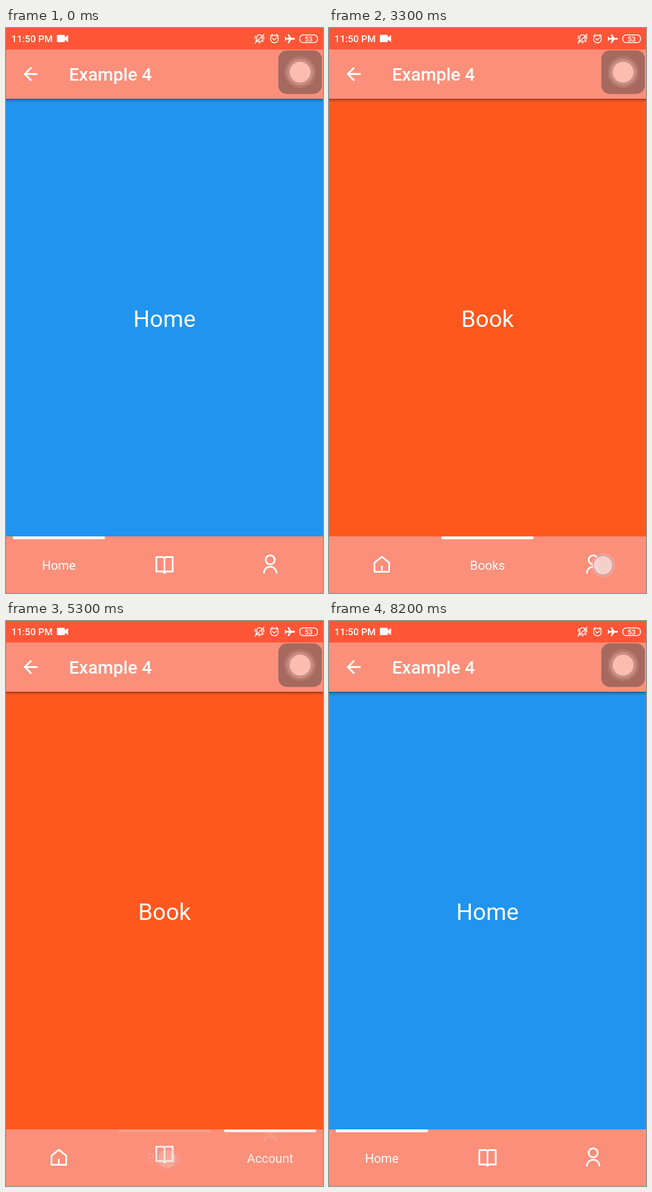
Recreate the animation shown at these times as an HTML page. Size 561 by 998 pixels, loop 8300 ms.

```html
<!DOCTYPE html>
<html lang="en">
<head>
<meta charset="utf-8">
<title>Tab bar</title>
<style>
  html, body { margin: 0; width: 100%; height: 100%; overflow: hidden; background: #fb8f7a; }
  svg { display: block; width: 100%; height: 100%; }
  text { font-family: Roboto, "Noto Sans", sans-serif; fill: #fff; }
  .mid { text-anchor: middle; }
  .line { fill: none; stroke: #fff; stroke-linejoin: round; }
</style>
</head>
<body>
<svg viewBox="0 0 561 998" xmlns="http://www.w3.org/2000/svg">
  <defs>
    <linearGradient id="shade" x1="0" y1="0" x2="0" y2="1">
      <stop offset="0" stop-color="#000" stop-opacity=".42"/>
      <stop offset=".4" stop-color="#000" stop-opacity=".14"/>
      <stop offset="1" stop-color="#000" stop-opacity="0"/>
    </linearGradient>
    <radialGradient id="glow">
      <stop offset=".7" stop-color="#f4c3c3" stop-opacity=".75"/>
      <stop offset="1" stop-color="#f4b0b0" stop-opacity="0"/>
    </radialGradient>
    <clipPath id="navClip"><rect y="898" width="561" height="100"/></clipPath>
  </defs>

  <rect id="page" y="120" width="561" height="780"/>
  <text id="label" class="mid" x="280.5" y="527.5" font-size="41"></text>
  <rect y="125" width="561" height="7" fill="url(#shade)"/>

  <!-- status bar -->
  <rect width="561" height="38" fill="#ff5638"/>
  <text x="9.5" y="25" font-size="17" font-weight="500">11:50 PM</text>
  <path fill="#fff" d="M91.500 12H102.500Q104 12 104 13.500V16.500L110 12.500V25L104 21V23.500Q104 25 102.500 25H91.500Q90 25 90 23.500V13.500Q90 12 91.500 12Z"/>
  <g class="line" stroke-width="1.6" stroke-linecap="round">
    <path d="M442 23.500H455L453.300 20.500V17C453.300 13.500 451.500 12 448.500 12S443.700 13.500 443.700 17V20.500ZM447 26H450M456.500 11L440.500 27M441.500 14Q440 16.500 441 19M455.500 14.500Q457 17 456 19.500"/>
    <circle cx="475" cy="19.500" r="6.800"/>
    <path d="M472 18.500L474.500 21.500L478.500 17.500M468 14L471.500 11M482 14L478.500 11"/>
    <rect x="519.800" y="12.300" width="31.500" height="13.400" rx="6"/>
  </g>
  <path fill="#fff" d="M511.500 19Q511.500 17.700 509.500 17.600L505 17.500L500.500 11H498.500L500.700 17.500L496.500 17.800L494.500 15.500H493L494.200 19L493 22.500H494.500L496.500 20.200L500.700 20.500L498.500 27H500.500L505 20.500L509.500 20.400Q511.500 20.300 511.500 19Z"/>
  <text class="mid" x="535.500" y="23.500" font-size="12.500" font-weight="500">53</text>

  <!-- header -->
  <rect y="38" width="561" height="87" fill="#fb8f7a"/>
  <path class="line" style="stroke-linejoin:miter" stroke-width="3.200" d="M56 81.300H34M44.800 69.800L33.300 81.300L44.800 92.800"/>
  <text x="111.500" y="93" font-size="31.500" font-weight="500">Example 4</text>
  <rect x="482" y="39.500" width="77" height="77" rx="15" fill="#a5695f"/>
  <circle cx="520.500" cy="78" r="28" fill="#b2786e"/>
  <circle cx="520.500" cy="78" r="23.500" fill="#c98d82"/>
  <circle cx="520.500" cy="78" r="18.500" fill="#fdbcb0"/>

  <!-- tab bar -->
  <rect y="898" width="561" height="100" fill="#fb8f7a"/>
  <g id="tabs" clip-path="url(#navClip)"></g>
  <g id="touch">
    <circle r="23" fill="url(#glow)"/>
    <circle r="17" fill="#f6dcd6" fill-opacity=".72" stroke="#a68a9c" stroke-opacity=".65" stroke-width="1.600"/>
  </g>
</svg>
<script>
const LOOP = 8300, TICK = 100, MOVE = 400, LIFT = 48, PRESS = 200;

// icon paths are relative to the centre of each tab
const tabs = [
  { x: 93.5, name: 'Home', title: 'Home', color: '#2094ee',
    icon: 'M-13 -3.500L0 -14L13 -3.500V12.500H-13ZM0 2V12.500' },
  { x: 280.5, name: 'Books', title: 'Book', color: '#ff581e',
    icon: 'M0 -11.500Q-1 -13.500 -4 -13.500H-14.500V12H-4Q-1 12 0 15Q1 12 4 12H14.500V-13.500H4Q1 -13.500 0 -11.500V15' },
  { x: 467.5, name: 'Account', title: 'Account', color: '#e61f5e',
    icon: 'M-8 -8.500a8 8 0 1 0 16 0a8 8 0 1 0 -16 0M-11 15.500V14.500a11 11 0 0 1 22 0V15.500' }
];

const taps = [
  { at: 1600, to: 1, x: 294, y: 946 },
  { at: 3400, to: 2, x: 485, y: 949 },
  { at: 5200, to: 1, x: 285, y: 950 },
  { at: 6600, to: 0, x: 88, y: 973 }
];

const $ = id => document.getElementById(id);
const page = $('page'), label = $('label'), touch = $('touch');

function add(parent, tag, attrs, text = '') {
  const el = document.createElementNS('http://www.w3.org/2000/svg', tag);
  for (const key in attrs) el.setAttribute(key, attrs[key]);
  el.textContent = text;
  return parent.appendChild(el);
}

for (const tab of tabs) {
  const g = add($('tabs'), 'g', { transform: `translate(${tab.x} 948)` });
  tab.mark = add(g, 'path', { class: 'line', d: tab.icon, 'stroke-width': 3 });
  tab.on = add(g, 'g', {});
  add(tab.on, 'rect', { x: -81.2, y: -50, width: 162.4, height: 5, fill: '#fff' });
  add(tab.on, 'text', { class: 'mid', y: 8.8, 'font-size': 22.2 }, tab.name);
}

const ease = u => u < .5 ? 2 * u * u : 1 - 2 * (1 - u) ** 2;
const clamp = v => Math.max(0, Math.min(1, v));

function draw(t) {
  let now = 0, before = 0, p = 1;
  let finger = null, alpha = 0;
  for (const tap of taps) {
    const dt = t - tap.at;
    if (dt >= 0) {
      before = now;
      now = tap.to;
      p = ease(clamp(dt / MOVE));
    }
    if (dt >= -PRESS && dt < PRESS) {
      finger = tap;
      alpha = dt < 0 ? 1 : .7 - .35 * dt / TICK;
    }
  }
  page.setAttribute('fill', tabs[now].color);
  label.textContent = tabs[now].title;
  tabs.forEach((tab, i) => {
    const level = i === now ? p : i === before ? 1 - p : 0;
    tab.on.setAttribute('opacity', level);
    tab.mark.setAttribute('opacity', 1 - level);
    tab.mark.setAttribute('transform', `translate(0 ${-LIFT * level})`);
  });
  touch.setAttribute('opacity', alpha);
  if (finger) touch.setAttribute('transform', `translate(${finger.x} ${finger.y})`);
}

const start = performance.now();
function frame() {
  const t = (performance.now() - start) % LOOP;
  draw(Math.floor(t / TICK) * TICK);
  requestAnimationFrame(frame);
}
draw(0);
requestAnimationFrame(frame);
</script>
</body>
</html>
```
